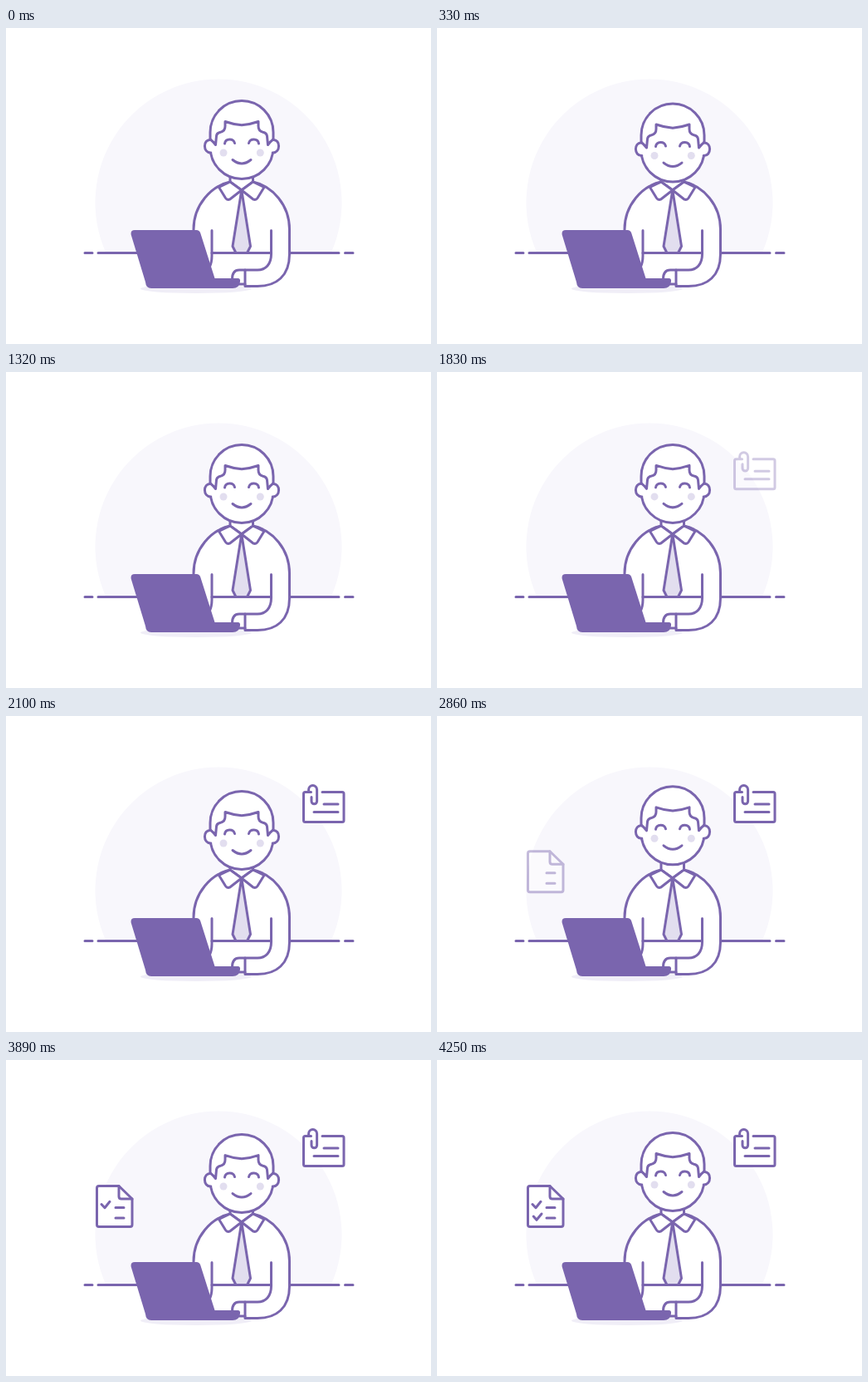
An HTML page that plays this animation: 512 by 380 pixels, repeating every 4610 ms.

```html
<!DOCTYPE html>
<html lang="en">
<head>
<meta charset="utf-8">
<title>At the desk</title>
<style>
html, body { margin: 0; width: 100%; height: 100%; overflow: hidden; background: #fff; }
svg { display: block; width: 100vw; height: 100vh; }
.line { fill: none; stroke: #7a65ae; stroke-width: 3; stroke-linecap: round; stroke-linejoin: round; }
.white { fill: #fff; }
.tint { fill: #e2deef; }
.solid { fill: #7a65ae; }
</style>
</head>
<body>
<svg viewBox="0 0 512 380">
  <path fill="#f8f7fc" d="M120.4 270.5A148.5 148.5 0 1 1 391.6 270.5Z"/>

  <g id="note" class="line">
    <path class="white" stroke="none" d="M358.5 91.5H407V127.5H358.5Z"/>
    <path d="M367.5 91.5H360.5Q358.5 91.5 358.5 93.5V125.5Q358.5 127.5 360.5 127.5H405Q407 127.5 407 125.5V93.5Q407 91.5 405 91.5H381"/>
    <path d="M364.6 91V88.5A5 5 0 0 1 374.6 88.5V102.5A3.3 3.3 0 0 1 368 102.5V97.5"/>
    <path d="M383 106H400M371 115.5H400"/>
  </g>

  <g id="list" class="line">
    <path class="white" d="M136 151.5H112Q109.5 151.5 109.5 154V198Q109.5 200.5 112 200.5H149.5Q152 200.5 152 198V167Z"/>
    <path d="M136 151.5V164Q136 167 139 167H152M132 177.5H142M132 190H142"/>
    <path id="tick1" pathLength="1" d="M115 173.5L119 177.7L125 170.3"/>
    <path id="tick2" pathLength="1" d="M116.2 188L120 192.3L126 185"/>
  </g>

  <ellipse cx="229" cy="313.5" rx="67" ry="5.5" fill="#f0eef7"/>
  <g class="line">
    <path d="M95 270.5H104M111 270.5H401M408.500 270.5H418"/>
    <path class="white" stroke="none" d="M226 243C226 211 247 190 270 185H297.500C321 190 341.500 211 341.500 243V272C341.500 298 326 310.500 303 310.500H226Z"/>
    <path d="M248 270.500H319.500"/>
    <path d="M226 246V242C226 213 247 190 270 185M297.500 185C321 190 341.500 213 341.500 242V272C341.500 298 326 310.500 303 310.500H288V291"/>
    <path d="M248 243.500V274Q248 282 245 288M319.500 243.500V272C319.500 284 313 291 303 291H281C275.500 291 272.500 295 272.500 302M281 308H288"/>
    <path class="tint" d="M283.800 195L273 262.500L277 270.500H290.500L294.500 262.500Z"/>
    <path class="white" d="M270 176V185L283.800 195L297.500 185V176"/>
    <path class="white" d="M270 185L256.500 191.500L264.500 204.500Q266.500 207.500 270 205.800L283.800 195Z"/>
    <path class="white" d="M297.500 185L311 191.500L303 204.500Q301 207.500 297.500 205.800L283.800 195Z"/>
  </g>
  <path class="solid" d="M155 243H229.500Q233 243 234.200 246.500L251.500 301H279.500Q282 301 282 303.500V305Q281 313 273 313H175Q168.500 313 168 305.500L150.800 249Q149.500 243 155 243Z"/>

  <g id="head" class="line">
    <path class="white" d="M246 125.500A38 38 0 0 1 322 125.500V143.500A38 38 0 0 1 246 143.500Z"/>
    <path class="white" stroke="none" d="M244 134H249V150H244ZM319 134H324V150H319Z"/>
    <path class="white" d="M246.500 134.500C237 133.500 237 150.500 246.800 150M321.500 134.500C331 133.500 331 150.500 321.200 150"/>
    <path d="M246.200 134Q249.500 136.500 252.500 140.500L253.500 130Q254 126 258.500 125.200Q264 124 264 118V112.500Q274 116 284 116.800Q294 116 304 112.500V118Q304 124 309.500 125.200Q314 126 314.500 130L315.500 140.500Q318.500 136.500 321.800 134"/>
    <path d="M263.500 139C264.500 132.500 274 132.500 275.500 138.500M292.500 138.500C294 132.500 303.500 132.500 304.500 139M273 158.500Q284 167.500 295 158.500"/>
    <g class="tint" stroke="none"><circle cx="262" cy="150" r="4.500"/><circle cx="306.300" cy="150" r="4.500"/></g>
  </g>
</svg>
<script>
const LOOP = 4610;
const el = id => document.getElementById(id);
const part = (t, from, to) => Math.min(1, Math.max(0, (t - from) / (to - from)));
const ease = p => (1 - Math.cos(Math.PI * p)) / 2;

// Head nod: time, vertical offset
const nod = [
  [0, 0], [240, 4.5], [630, -3], [1095, 1.5], [1340, 0], [1390, 0],
  [1635, -2], [2100, 3], [2460, 3], [2740, -3], [3340, 0],
  [3730, 0], [3990, 3], [4250, 0], [LOOP, 0]
];

function nodAt(t) {
  const i = nod.findIndex(k => k[0] > t);
  const [t0, y0] = nod[i - 1], [t1, y1] = nod[i];
  return y0 + (y1 - y0) * ease(part(t, t0, t1));
}

function rise(id, p) {
  el(id).setAttribute('opacity', p);
  el(id).setAttribute('transform', `translate(0 ${20 * (1 - p)})`);
}

function tick(id, p) {
  el(id).style.visibility = p > 0 ? 'visible' : 'hidden';
  el(id).setAttribute('stroke-dasharray', p < 1 ? `${p} 2` : 'none');
}

function draw(t) {
  el('head').setAttribute('transform', `translate(0 ${nodAt(t)})`);
  rise('note', part(t, 1700, 2090));
  rise('list', part(t, 2690, 3080));
  tick('tick1', part(t, 3100, 3340));
  tick('tick2', part(t, 3990, 4250));
}

const start = performance.now();
function frame(now) {
  draw(Math.max(0, now - start) % LOOP);
  requestAnimationFrame(frame);
}
draw(0);
requestAnimationFrame(frame);
</script>
</body>
</html>
```
